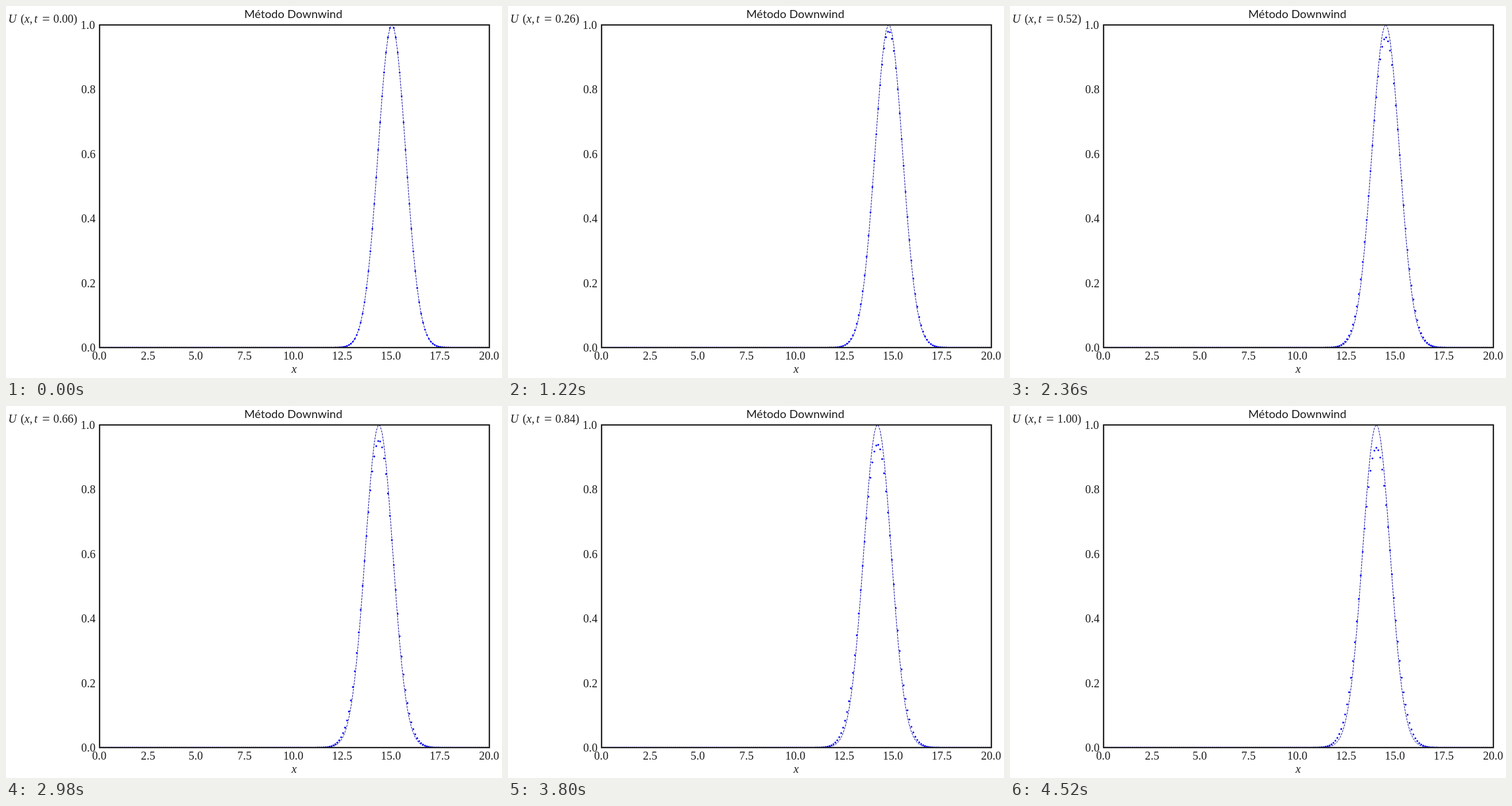
Recreate the animation shown at these times as an HTML page with a canvas. Size 864 by 648 pixels, loop 4620 ms.

```html
<!DOCTYPE html>
<html lang="es">
<head>
<meta charset="utf-8">
<title>Método Downwind</title>
<style>
  html, body { margin: 0; width: 100%; height: 100%; overflow: hidden; background: #fff; }
  canvas { display: block; }
</style>
</head>
<body>
<canvas id="stage" width="864" height="648"></canvas>
<script>
const ctx = document.getElementById('stage').getContext('2d');
const LOOP = 4620, STEPS = 50, DT = 0.02, DX = 0.1, CELLS = 200;
const LEFT = 162.6, TOP = 32.6, RIGHT = 842, BOTTOM = 595;
const SERIF = '"Liberation Serif", serif';
const INK = '#1c1c1c';

const px = x => LEFT + x / 20 * (RIGHT - LEFT);
const py = u => BOTTOM + u * (TOP - BOTTOM);
const pulse = (x, t) => Math.exp(-((x - 15 + t) ** 2));

// Numerical solution of u_t = u_x, one row per time step
const rows = [Array.from({ length: CELLS + 1 }, (_, i) => pulse(i * DX, 0))];
for (let k = 0; k < STEPS; k++) {
  const u = rows[k];
  rows.push(u.map((v, i) => v + DT / DX * ((u[i + 1] ?? 0) - v)));
}

// Steps last 100 ms, with a short 20 ms one now and then
const startOf = k => 100 * k - 80 * Math.round(k / 8.8);

function stepAt(ms) {
  let k = STEPS;
  while (k > 0 && startOf(k) > ms) k--;
  return k;
}

function label(text, x, y, align = 'left', font = '20px ' + SERIF) {
  ctx.font = font;
  ctx.textAlign = align;
  ctx.fillStyle = INK;
  ctx.fillText(text, x, y);
}

const italic = (text, x, y, align) => label(text, x, y, align, 'italic 20px ' + SERIF);

// The visible edge of the first digit, not its side bearing, sits at the box's left
function tick(value, anchor, y, shift) {
  const text = value.toFixed(1);
  ctx.font = '20px ' + SERIF;
  ctx.textAlign = 'left';
  const box = ctx.measureText(text);
  label(text, Math.floor(anchor - shift * box.width) + box.actualBoundingBoxLeft, y);
}

function drawCurve(t) {
  ctx.beginPath();
  for (let i = 0; i <= CELLS; i++) ctx.lineTo(px(i * DX), py(pulse(i * DX, t)));
  ctx.strokeStyle = '#000098';
  ctx.lineWidth = 1;
  ctx.setLineDash([3.7, 1.6]);
  ctx.stroke();
  ctx.setLineDash([]);
}

function drawDots(u) {
  ctx.fillStyle = '#00f';
  u.forEach((v, i) => {
    ctx.beginPath();
    ctx.arc(px(i * DX), py(v), 1.55, 0, 2 * Math.PI);
    ctx.fill();
  });
}

function drawAxes() {
  const x0 = Math.round(LEFT), y0 = Math.round(TOP);
  ctx.strokeStyle = INK;
  ctx.lineWidth = 2.3;
  ctx.strokeRect(x0, y0, RIGHT - x0, BOTTOM - y0);
  for (let x = 0; x <= 20; x += 2.5) tick(x, px(x), 615.5, 0.5);
  for (let i = 0; i <= 5; i++) tick(i / 5, 156.5, Math.round(py(i / 5) + 7), 1);
  label('Método Downwind', 500.5, 21, 'center', '20px Lato, sans-serif');
  italic('x', 502, 638.5, 'center');
}

function drawTime(t) {
  const y = 28.5;
  italic('U', 4, y);
  label('(', 25.5, y);
  italic('x', 32.3, y);
  label(',', 41.3, y);
  italic('t', 49.3, y);
  label('=', 69.8, y + 1, 'center', '24px ' + SERIF);
  label(t.toFixed(2) + ')', 82.5, y);
}

function draw() {
  const k = stepAt(performance.now() % LOOP), t = k * DT;
  ctx.fillStyle = '#fff';
  ctx.fillRect(0, 0, 864, 648);
  ctx.save();
  ctx.beginPath();
  ctx.rect(LEFT, TOP, RIGHT - LEFT, BOTTOM - TOP);
  ctx.clip();
  drawCurve(t);
  drawDots(rows[k]);
  ctx.restore();
  drawAxes();
  drawTime(t);
  requestAnimationFrame(draw);
}
draw();
</script>
</body>
</html>
```
